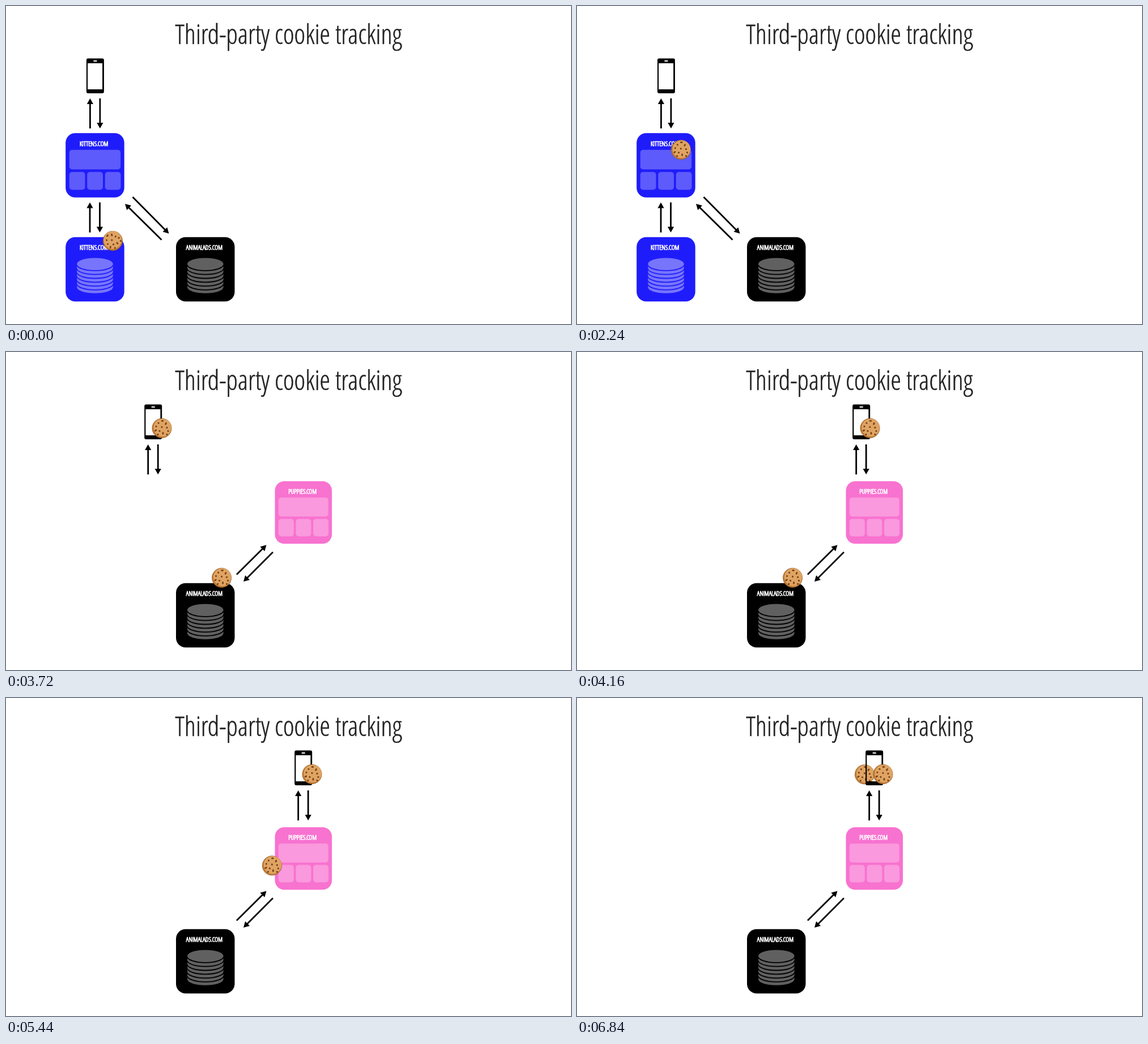
An HTML page that plays this animation: 997x561 px, repeating every 7.32 s.

```html
<!DOCTYPE html>
<html lang="en">
<head>
<meta charset="utf-8">
<title>Third-party cookie tracking</title>
<style>
  html, body { margin: 0; width: 100%; height: 100%; overflow: hidden; background: #fff; }
  svg { display: block; }
  text { font-family: "Open Sans", sans-serif; font-stretch: 75%; font-weight: 300; text-anchor: middle; }
  .title { font-size: 47.3px; fill: #222; stroke: #222; stroke-width: .5; }
  .label { font-size: 11.5px; fill: #fff; stroke: #fff; stroke-width: .9; }
  .slab { paint-order: stroke; stroke-width: 3.6; }
</style>
</head>
<body>
<svg id="stage" width="997" height="561" viewBox="0 0 997 561"></svg>
<script>
const LOOP = 7320, MOVE = 978, SWITCH = 3380;
const BLUE = '#1f1cfb', PINK = '#f872d0';

const rect = (x, y, w, h, r, attrs = '') =>
  `<rect x="${x}" y="${y}" width="${w}" height="${h}" rx="${r}" ${attrs}/>`;

const card = (color, name) =>
  rect(0, 0, 103.5, 113.5, 17, `fill="${color}"`) + `<text class="label" x="50" y="22.7">${name}</text>`;

function page(x, y, scale, color, name) {
  const tiles = [6.5, 38, 69.5].map(left => rect(left, 68.5, 27.8, 31.5, 5)).join('');
  return `<g transform="translate(${x} ${y}) scale(${scale})">${card(color, name)}
    <g fill="#fff" fill-opacity=".28">${rect(6.5, 29.5, 90.5, 34.5, 5)}${tiles}</g></g>`;
}

function server(x, y, color, discColor, name) {
  let discs = '';
  for (let i = 6; i > 0; i--) {
    const side = 47.5 + i * 6.8;
    discs += `<path class="slab" d="M20 ${side - 6}V${side}A31.8 10.8 0 0 0 83.6 ${side}V${side - 6}z"/>`;
  }
  return `<g transform="translate(${x} ${y})">${card(color, name)}<g fill="${discColor}" stroke="${color}">
    ${discs}<ellipse class="slab" cx="51.8" cy="47.5" rx="31.8" ry="10.8"/></g></g>`;
}

function arrow(x1, y1, x2, y2) {
  const angle = Math.atan2(y2 - y1, x2 - x1) * 180 / Math.PI;
  const length = Math.hypot(x2 - x1, y2 - y1);
  return `<path transform="translate(${x1} ${y1}) rotate(${angle})"
    d="M0-1.4H${length - 10}V-5.6L${length} 0L${length - 10} 5.6V1.4H0z"/>`;
}

const arrowPair = (x, top) => arrow(x - 9, top + 53, x - 9, top) + arrow(x + 8.5, top, x + 8.5, top + 53);

function cookie(id) {
  const chips = [[1, -13], [-6, -9], [-10, -3], [-11, 4], [-4, 5], [0, -2], [7, -8],
    [9, -1], [11, 5], [2, 9], [-7, 11], [9, 11]];
  const drawn = chips.map(([x, y], i) =>
    `<ellipse rx="${i % 3 ? 1.7 : 2.4}" ry="1.5" transform="translate(${x} ${y}) rotate(${i * 50})"/>`).join('');
  return `<g id="${id}"><circle r="17.1" fill="#c27a33" stroke="#8c5a2a" stroke-width=".7"/>
    <circle cx="1.1" cy="-1" r="15.7" fill="#dfa463"/><g fill="#7a4317">${drawn}</g></g>`;
}

const phone = `<path fill-rule="evenodd" d="M-12.5 92.5h25q3 0 3 3v55.5q0 3-3 3h-25q-3 0-3-3v-55.5q0-3 3-3z
  M-13.3 101v46h26v-46zM-3 96v2h6v-2z"/>`;

const get = id => document.getElementById(id);

get('stage').innerHTML = `
  <text class="title" x="498.5" y="66.7">Third-party cookie tracking</text>
  ${server(300, 407.7, '#000', '#606060', 'ANIMALADS.COM')}
  <g id="kittens">
    ${page(105.2, 224.2, 1, BLUE, 'KITTENS.COM')}
    ${server(105.2, 407.7, BLUE, '#7775fc', 'KITTENS.COM')}
    ${arrowPair(157, 346.5)}${arrow(223.5, 337, 287.5, 401.5)}${arrow(274.5, 412.5, 210, 349)}
  </g>
  <g id="puppies">
    ${page(474.5, 228, .972, PINK, 'PUPPIES.COM')}
    ${arrow(407, 392.5, 459.5, 340.5)}${arrow(471, 353, 419, 405)}
    ${cookie('adCookie')}
  </g>
  <g id="device">${phone}${arrowPair(0, 163)}</g>
  ${cookie('siteCookie')}`;

// Quadratic ease in and out, starting at the given time.
function progress(time, start) {
  const p = Math.min(1, Math.max(0, (time - start) / MOVE));
  return p < .5 ? 2 * p * p : 1 - 2 * (1 - p) ** 2;
}

// Follows stops [x, y, angle], one move per start time.
function follow(time, stops, starts) {
  return stops[0].map((value, axis) => starts.reduce((sum, start, i) =>
    sum + (stops[i + 1][axis] - stops[i][axis]) * progress(time, start), value));
}

const place = (id, [x, y, angle = 0]) =>
  get(id).setAttribute('transform', `translate(${x} ${y}) rotate(${angle})`);

function draw(now) {
  const time = now % LOOP, second = time >= SWITCH;
  const phoneX = 157.4 + 367.3 * progress(time, 3356);
  get('kittens').style.display = second ? 'none' : '';
  get('puppies').style.display = second ? '' : 'none';
  place('device', [phoneX, 0]);
  place('siteCookie', second ? [phoneX + 15.3, 134.4] :
    follow(time, [[188.3, 414.3, -50], [188.7, 285.7, 10], [164.2, 137.7, -40]], [479, 1919]));
  place('adCookie',
    follow(time, [[380.6, 398.3, 0], [473.7, 290.7, 0], [507.5, 134.8, 0]], [4612, 5861]));
  requestAnimationFrame(draw);
}
requestAnimationFrame(draw);
</script>
</body>
</html>
```
